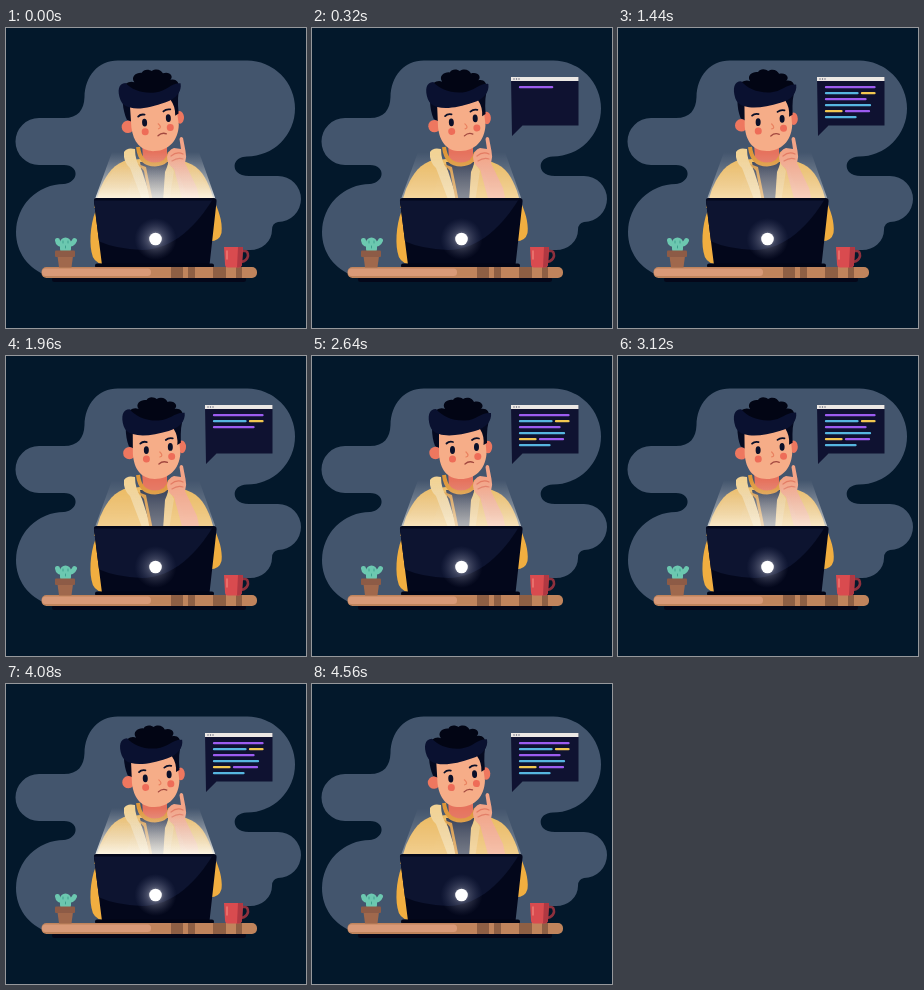
An HTML page for the animation above (4.8 s loop, 300 px wide and 300 px high).

```html
<!DOCTYPE html>
<html lang="en">
<head>
<meta charset="utf-8">
<title>Thinking at the laptop</title>
<style>
html, body { margin: 0; width: 100%; height: 100%; overflow: hidden; background: #03182b; }
svg { display: block; width: 100vw; height: 100vh; }
</style>
</head>
<body>
<svg viewBox="0 0 300 300">
  <defs>
    <linearGradient id="beamFill" x1="0" y1="1" x2="0" y2="0">
      <stop offset="0" stop-color="#fffdf4"/>
      <stop offset=".3" stop-color="#f4efe4" stop-opacity=".7"/>
      <stop offset="1" stop-color="#dfe0e2" stop-opacity="0"/>
    </linearGradient>
    <radialGradient id="glowFill">
      <stop offset="0" stop-color="#fff" stop-opacity=".75"/>
      <stop offset=".4" stop-color="#c9cbe0" stop-opacity=".3"/>
      <stop offset="1" stop-color="#7d84ad" stop-opacity="0"/>
    </radialGradient>
    <clipPath id="lidClip"><path id="lidShape" d="M90 170H208Q211 170 210.500 174L203.500 237H96L88 174Q87.500 170 90 170Z"/></clipPath>
    <clipPath id="deskClip"><rect x="35.500" y="239" width="215.500" height="11" rx="5"/></clipPath>
  </defs>

  <rect width="300" height="300" fill="#03182b"/>
  <path fill="#43556d" d="M112 32.500H241A48 48 0 0 1 241 128.500C229 129 226 138 231 144Q235 148 243 148H272A23 23 0 0 1 272 194
    Q266 195 266 202A22 20 0 0 1 244 222H228V248H42C22 241 10 224 10 204A48 48 0 0 1 58 156
    C68 155 73 146 67 140Q64 137 58 137H33A23.500 23.500 0 0 1 33 90H58C72 90 78 82 78.500 69C79 48 92 32.500 112 32.500Z"/>

  <!-- body -->
  <path fill="#f1ae40" d="M92 178C85 190 83 212 85.500 224Q87 234 96 236H200V213Q213 215 215.500 205C217 193 212 181 207 170Z"/>
  <path fill="#edb95c" d="M118 133C104 139 99 150 94 161L88 180H210L205 163C200 150 195 139 180 134L150 129Z"/>
  <path fill="#2d3750" d="M134 134H162L158 180H142Z"/>
  <path fill="#e6725d" d="M136 114H161V132Q149 143 137 132Z"/>
  <path fill="none" stroke="#df9738" stroke-width="4" d="M132 119Q134 136.500 149 136.500Q162 136 164 124"/>
  <path fill="#f2d395" d="M118 124Q121 119 129 121Q129 134 136 143L146 174H137L124 140Q117 134 118 124Z"/>
  <path fill="#d9953c" d="M132 136L138 143L144 174H147L140 139Z"/>
  <path fill="#eec780" d="M163 134L159 144L157 174H163L168 143Z"/>

  <g id="head">
    <path fill="#050a20" d="M129 94L123 90Q120 82 120 72H134V78Z"/>
    <circle cx="123.500" cy="97" r="6.200" fill="#ee775f"/>
    <ellipse cx="176" cy="91" rx="4.200" ry="6.300" fill="#ee775f"/>
    <path fill="#f6ad88" d="M127 78Q128 68 148 68Q171 66 173 78L174.500 98C173 114 163 123 149 123C135 123 128 113 127 98Z"/>
    <path fill="#050a20" d="M166 68L178 62Q174.500 69 175 87L171.500 89Q172.500 80 168 73Z"/>
    <path fill="#020514" d="M124 54Q129 51 133 53C129 47 136 43 141 44C143 40 149 41 151 43C156 40 161 43 162 46
      C169 44 173 50 169 53C175 52 177 56 177 59L160 72H138Z"/>
    <path fill="#0a1130" d="M118 70C115 60 117 53 124 53C130 60 140 65 153 64.500C165 64 169 56 179 57
      C180 65 174 72 163 75C149 79 136 81 127 78Q120 76 118 70Z"/>
    <g fill="none" stroke="#0b1029" stroke-width="1.800" stroke-linecap="round">
      <path d="M134.500 87.500Q137 85 141 86M160 84Q163 81.500 167 82.500"/>
      <path stroke="#a2483f" stroke-width="1.300" d="M153 108Q157 104.500 161.500 106.500"/>
      <path stroke="#e9805f" stroke-width="1.200" d="M154 96Q158 100 154 101"/>
    </g>
    <g fill="#0b1029">
      <ellipse cx="140.500" cy="94" rx="2.500" ry="3.900"/>
      <ellipse cx="164.500" cy="91" rx="2.500" ry="3.900"/>
    </g>
    <g fill="#ee6c58">
      <circle cx="140.500" cy="103" r="3.500"/>
      <circle cx="165.800" cy="100.500" r="3.500"/>
    </g>
  </g>

  <!-- hand -->
  <path fill="#f3a487" d="M161 129Q162 122 168 120L175 121L173.500 111Q174.500 107.500 177 110L179.500 123Q181 129 179 135L191 160L194 174H177L168 141Q161 136 161 129Z"/>
  <path fill="none" stroke="#e37a62" stroke-width="1.200" stroke-linecap="round" d="M165 128Q171 123 177 126M166 133Q172 129 177 131"/>

  <g id="beam" fill="url(#beamFill)">
    <path d="M106 124H193L209.500 171H89Z"/>
    <path opacity=".3" d="M113 132H186L208 171H91Z"/>
    <path opacity=".25" d="M131 138H170L182 171H119Z"/>
  </g>

  <!-- laptop -->
  <use href="#lidShape" fill="#03071b"/>
  <path clip-path="url(#lidClip)" fill="#0d1430" d="M88 172.500H206C192 195 168 222 136 222Q110 221 92 213Z"/>
  <rect x="89" y="235.500" width="119" height="4.500" rx="2" fill="#020515"/>
  <circle id="glow" cx="149.500" cy="211" r="21" fill="url(#glowFill)"/>
  <circle cx="149.500" cy="211" r="6.300" fill="#fff"/>

  <!-- desk -->
  <rect x="46" y="249" width="194" height="5" rx="2.500" fill="#040719"/>
  <g clip-path="url(#deskClip)">
    <rect x="35" y="239" width="216" height="11" fill="#c0845c"/>
    <rect x="36" y="240.500" width="109" height="7.500" rx="3.500" fill="#d99a78"/>
    <path fill="#8e5f44" d="M165 239h12v11h-12zM182 239h7v11h-7zM207 239h13v11h-13zM230 239h6v11h-6z"/>
  </g>

  <!-- cactus -->
  <g stroke="#6cc8b0" stroke-width="5" stroke-linecap="round" fill="none">
    <path d="M51.500 212.500Q52 217 59 217Q67 217 68.500 212.500"/>
    <path stroke-width="11" d="M59.500 215V221"/>
  </g>
  <path stroke="#3fa08e" stroke-width="1" stroke-linecap="round" d="M57 213v2M62 213v2M59.500 218v2"/>
  <path fill="#a0684c" d="M51.500 228H67L65.500 239.500H53Z"/>
  <rect x="49" y="222.500" width="20" height="6.500" rx="1" fill="#8d5b46"/>

  <!-- cup -->
  <path fill="none" stroke="#8d303d" stroke-width="2.600" d="M236 223H239Q242 223 242 228Q241 233 235 234"/>
  <path fill="#d94b4f" d="M218 219H237L236 236Q236 239.500 232 239.500H222Q219 239.500 219 236Z"/>
  <path fill="#b03842" d="M232 219H237L236 236Q236 239.500 231 239.500Z"/>
  <path stroke="#ef7f77" stroke-width="1.400" stroke-linecap="round" d="M221 223V231"/>

  <g id="bubble">
    <path fill="#0f1231" d="M199 49H266.500V97.500H210.500L200 108Z"/>
    <rect x="199" y="49" width="67.500" height="4" fill="#ece8e4"/>
    <g fill="#5b5e72"><circle cx="202" cy="51" r=".7"/><circle cx="204.500" cy="51" r=".7"/><circle cx="207" cy="51" r=".7"/></g>
    <g id="code" stroke-width="2.300" stroke-linecap="round"></g>
  </g>
</svg>
<script>
const LOOP = 4800, ROW_TIME = 92, LEFT = 207, SPAN = 50;
const PURPLE = '#9c5cf0', CYAN = '#56b6e0', YELLOW = '#f2c850';
const el = id => document.getElementById(id);
const clamp = v => Math.max(0, Math.min(1, v));
const ease = v => v * v * (3 - 2 * v);

// each row: [from, to, colour] pieces
const rows = [
  [[208, 256.5, PURPLE]],
  [[208, 239.5, CYAN], [244, 256.5, YELLOW]],
  [[208, 247.5, PURPLE]],
  [[208, 252, CYAN]],
  [[208, 223.5, YELLOW], [228, 251, PURPLE]],
  [[208, 237.5, CYAN]]
];
const pieces = rows.flatMap((row, i) => row.map(([from, to, color]) => {
  const line = document.createElementNS('http://www.w3.org/2000/svg', 'line');
  const y = 59.2 + i * 6;
  Object.entries({ x1: from, y1: y, y2: y, stroke: color }).forEach(a => line.setAttribute(...a));
  el('code').append(line);
  return { line, from, to, i };
}));

const typingStarts = [260, 1684, 3376];
const sway = [[0, 0], [720, 0.95], [1440, 0.82], [1960, 0.92], [2640, 1], [3560, 0.65], [4560, 0.1], [LOOP, 0]];

function track(keys, t) {
  const i = keys.findIndex(k => k[0] > t);
  const [t0, a] = keys[i - 1], [t1, b] = keys[i];
  return a + (b - a) * ease((t - t0) / (t1 - t0));
}

function backOut(v) {
  const u = v - 1;
  return 1 + 2.2 * u * u * u + 1.2 * u * u;
}

function draw(t) {
  el('head').setAttribute('transform', `rotate(${-3.8 * (1 - track(sway, t))} 150 123)`);

  const light = 0.5 + 0.5 * Math.cos(2 * Math.PI * (t / 800 - 0.08));
  el('beam').setAttribute('opacity', 0.25 + 0.65 * light);
  el('glow').setAttribute('opacity', 0.75 + 0.25 * light);

  const pop = clamp((t - 30) / 230);
  const scale = pop ? backOut(pop) : 0;
  el('bubble').setAttribute('visibility', scale > 0 ? 'visible' : 'hidden');
  el('bubble').setAttribute('transform', `translate(200 108) scale(${Math.max(scale, 0.001)}) translate(-200 -108)`);

  const start = typingStarts.filter(s => s <= t).pop() ?? LOOP;
  for (const { line, from, to, i } of pieces) {
    const x = LEFT + SPAN * clamp((t - start) / ROW_TIME - i);
    line.setAttribute('x2', Math.max(from, Math.min(to, x)));
    line.setAttribute('visibility', x > from ? 'inherit' : 'hidden');
  }
}

const begin = performance.now();
function tick() {
  draw((performance.now() - begin) % LOOP);
  requestAnimationFrame(tick);
}
draw(0);
requestAnimationFrame(tick);
</script>
</body>
</html>
```
